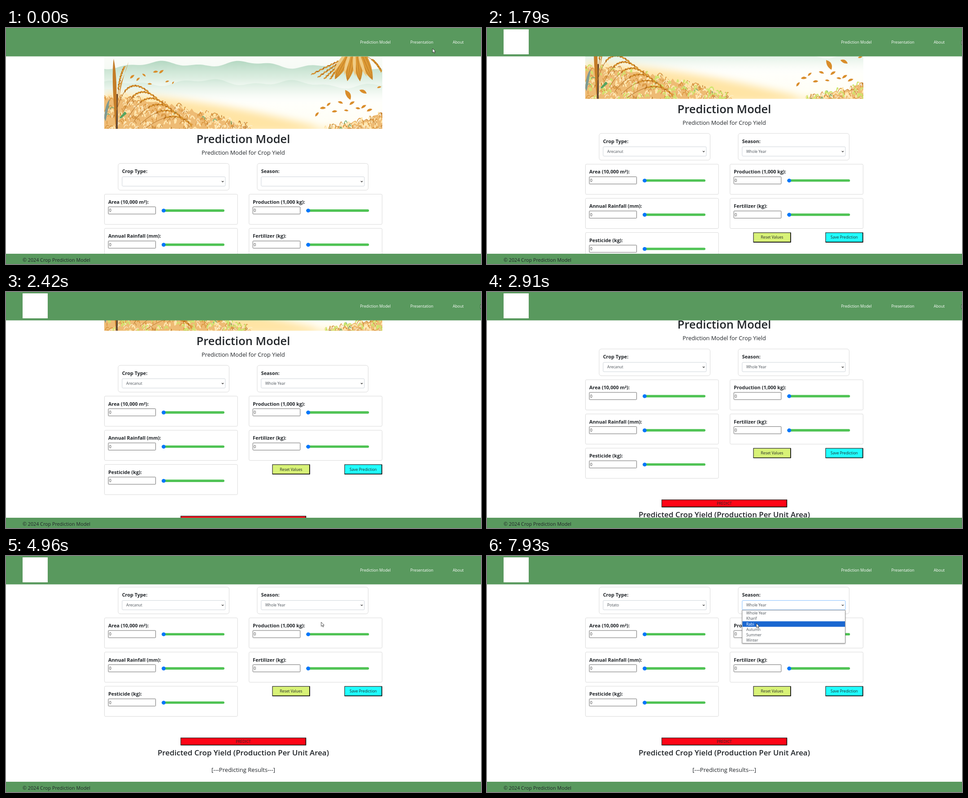
Recreate the animation shown at these times as an HTML page. Size 1059 px wide and 529 px high, loop 7.99 s.

```html
<!DOCTYPE html>
<html lang="en">
<head>
<meta charset="utf-8">
<title>Prediction Model</title>
<style>
html, body { margin: 0; width: 100%; height: 100%; overflow: hidden; background: #fff; }
svg { display: block; }
text { font-family: "Open Sans", "Noto Sans", sans-serif; white-space: pre; }
.pop { filter: drop-shadow(0 1px 1.5px #0006); }
</style>
</head>
<body>
<svg id="stage" width="1059" height="529" viewBox="0 0 1059 529"></svg>
<script>
const LOOP = 7990, ROW = 12.29, LIST_TOP = 121.8;
const INK = '#212529', GRAY = '#495057', GREEN = '#59995e';
const CROPS = ['Arecanut', 'Arhar/Tur', 'Castor seed', 'Coconut', 'Cotton(lint)', 'Dry chillies', 'Gram',
  'Jute', 'Linseed', 'Maize', 'Mesta', 'Niger seed', 'Onion', 'Other Rabi pulses', 'Potato',
  'Rapeseed &amp;Mustard', 'Rice', 'Sesamum', 'Small millets', 'Sugarcane'];
const SEASONS = ['Whole Year', 'Kharif', 'Rabi', 'Autumn', 'Summer', 'Winter'];
const FIELDS = ['Area (10,000 m²):', 'Production (1,000 kg):', 'Annual Rainfall (mm):', 'Fertilizer (kg):', 'Pesticide (kg):'];

let seed = 11;
const rnd = (a = 0, b = 1) => a + (b - a) * (seed = seed * 16807 % 2147483647) / 2147483647;
const times = (n, fn) => Array.from({ length: n }, (_, i) => fn(i)).join('');

// ---- drawing helpers ----
const text = (x, y, size, str, fill = INK, more = '') =>
  `<text x="${x}" y="${y}" font-size="${size}" fill="${fill}" ${more}>${str}</text>`;
const mid = (y, size, str, weight = 400, x = 529) =>
  text(x, y, size, str, INK, `text-anchor="middle" font-weight="${weight}"`);
const rect = (x, y, w, h, fill, more = '') =>
  `<rect x="${x}" y="${y}" width="${w}" height="${h}" fill="${fill}" ${more}/>`;
const line = (d, color, w, more = '') =>
  `<path d="${d}" fill="none" stroke="${color}" stroke-width="${w}" ${more}/>`;
const shape = (d, fill, more = '') => `<path d="${d}" fill="${fill}" ${more}/>`;
const label = (x, y, str) => text(x, y, 10.85, str, INK, 'font-weight="700"');

// ---- banner ----
const ground = x => x < 340 ? 86 + 74 * (x / 340) ** 1.6 : 165 - Math.max(0, x - 470) * .25;
const outline = (y, step = 5) => 'M0 170' + times(620 / step + 1, i => `L${i * step} ${y(i * step).toFixed(1)}`) + 'V170Z';
const ridge = (y, phase) => outline(x => y + 5 * Math.sin(x / 32 + phase) + 3 * Math.sin(x / 13 + phase) - 5 * Math.sin(x / 150));

const leaf = (x, y, len, angle, fill = '#d98d2b') =>
  shape(`M${-len / 2} 0Q0 ${-len * .5} ${len / 2} 0Q0 ${len * .3} ${-len / 2} 0Z`, fill,
    `transform="translate(${x} ${y}) rotate(${angle})"`);
const drift = (n, x, y, w, h, size) =>
  times(n, i => leaf(x + w * (i + .5) / n, y + rnd(0, h), rnd(.5, 1) * size, rnd(-70, 50)));

// A stalk along a curve, with grains on its outer part
function ear(x0, y0, cx, cy, x1, y1) {
  const n = 18;
  return line(`M${x0} ${y0}Q${cx} ${cy} ${x1} ${y1}`, '#b9772a', 1.1) + times(n, i => {
    const t = .35 + .65 * i / n, u = 1 - t;
    const x = u * u * x0 + 2 * u * t * cx + t * t * x1, y = u * u * y0 + 2 * u * t * cy + t * t * y1;
    const a = Math.atan2(u * (cy - y0) + t * (y1 - cy), u * (cx - x0) + t * (x1 - cx)) * 180 / Math.PI;
    return leaf(x, y, 8, a + (i % 2 ? 32 : -32), i % 3 ? '#d8942f' : '#b9701d');
  });
}

const blades = (n, color, w, more = '') => line(times(n, () => {
  const x = rnd() < .74 ? rnd(0, 320) : rnd(490, 620), y = rnd(ground(x), 172), dx = rnd(-7, 11);
  return `M${x.toFixed(1)} ${y.toFixed(1)}q${(dx * .4).toFixed(1)} -9 ${dx.toFixed(1)} ${rnd(-7, 3).toFixed(1)}`;
}), color, w, 'stroke-linecap="round" ' + more);

const cob = (x, angle) => `<g transform="translate(${x} 14) rotate(${angle})">` +
  shape('M-9 -18Q-14 18 0 42Q13 18 9 -18Z', '#dc9a35') +
  line('M-5 -18Q-8 14 -1 38M0 -18V40M5 -18Q8 14 1 38', '#b06c1e', 1.3, 'stroke-dasharray="2 1.3"') +
  shape('M-9 -18Q-16 14 -9 30Q-4 0 -4 -18Z', '#f0cc85') + '</g>';

const banner = () => '<svg x="219" y="64" width="620" height="162">' +
  rect(0, 0, 620, 162, 'url(#sky)') +
  shape(ridge(21, 1), 'url(#hill)') + shape(ridge(62, 4), 'url(#hill)', 'opacity=".35"') +
  shape(outline(x => ground(x * .72) - 4), '#ffe4a4', 'filter="url(#soft)"') +
  shape(outline(x => ground(x) + rnd(0, 9)), '#eebb74') +
  blades(150, '#ffe6ae', 3) + blades(150, '#d9953f', 1.6) + blades(70, '#b5742b', 1) +
  blades(110, '#fdf2d2', 1.2) + blades(12, '#6aa86b', 1.6) + blades(130, '#cfe56e', 2.4, 'id="lime"') +
  line('M28 162V84', '#5c4638', 4) + shape('M21 5Q15 50 26 162Q31 50 21 5Z', '#c47c27') +
  shape('M36 60Q50 30 54 12Q33 70 29 130Z', '#d7953c') +
  shape('M0 138Q2 106 12 96Q9 118 3 145Z', '#7f9a92') + shape('M34 137L46 123 50 128 37 139Z', '#55a35f') +
  ear(30, 110, 30, 50, 46, 22) +
  times(6, i => ear(28 + 13 * i, 120 + 8 * i, 50 + 22 * i, 36 + 15 * i, 101 + 19 * i, 82 + 15 * i)) +
  times(5, i => {
    const a = 2.72 - i * .13, r = 100 - i * 10;
    return ear(552, 0, 530 - 3 * i, 4 + 5 * i, 552 + r * Math.cos(a), r * Math.sin(a));
  }) +
  ear(585, 0, 605, 8, 618, 34) + times(4, i => cob(534 + 16 * i, 28 - 17 * i)) +
  drift(8, 56, 33, 104, 30, 13) + drift(10, 468, 98, 130, 32, 16) +
  leaf(543, 86, 25, 62) + leaf(577, 79, 18, 25) + leaf(613, 69, 10, -15) + '</svg>';

// ---- form ----
const select = (x, title, id) =>
  rect(x, 303.5, 247.5, 60, '#fff', 'rx="5" stroke="#dadada"') + label(x + 8.7, 325, title) +
  rect(x + 8.9, 333.5, 230, 21, '#fff', `id="${id}Box" rx="2" stroke="#ced4da"`) +
  text(x + 18, 347, 8.5, '', GRAY, `id="${id}"`) +
  line(`M${x + 231} 343l2.1 2.2 2.1 -2.2`, '#333', 1.2);

function field(title, i) {
  const x = 219.5 + i % 2 * 322.3, y = 372.5 + (i >> 1) * 76.6;
  return rect(x, y, 296.7, 67.7, '#fff', 'rx="2.5" stroke="#dadada"') + label(x + 8.5, y + 21.3, title) +
    rect(x + 8.6, y + 28.3, 105.5, 16.2, '#fff', 'rx="1" stroke="#6c6c6c"') +
    text(x + 10.5, y + 39.8, 8.5, '0', '#333') +
    rect(x + 127.5, y + 34, 140, 5.4, '#4fc354', 'rx="2.7"') +
    `<circle cx="${x + 132}" cy="${y + 36.8}" r="4.3" fill="#0075ff"/>`;
}

const button = (x, y, w, h, fill, str) =>
  rect(x, y, w, h, fill, 'stroke="#333" stroke-width="1.3"') +
  line(`M${x} ${y + h}h${w}v${-h}`, '#000', 1.3) + mid(y + h / 2 + 3.1, 8.5, str, 400, x + w / 2);

const page = banner() + mid(258, 25.5, 'Prediction Model', 600) +
  mid(284, 12.8, 'Prediction Model for Crop Yield') +
  select(250, 'Crop Type:', 'crop') + select(560, 'Season:', 'season') +
  FIELDS.map(field).join('') +
  button(594.1, 526.1, 82.9, 21.2, '#d8f277', 'Reset Values') +
  button(755, 526.1, 82.9, 21.2, '#20ffff', 'Save Prediction') +
  button(389.7, 641.5, 278.8, 16, '#ff0516', 'PREDICT') +
  mid(681, 16.9, 'Predicted Crop Yield (Production Per Unit Area)', 600) +
  mid(718, 13.1, '[---Predicting Results---]');

const popup = (id, x, items, h, bar) =>
  `<g id="${id}" class="pop">` + rect(x, 121.5, 229.5, h, '#fff', 'stroke="#888" stroke-width=".8"') +
  rect(x + .4, 0, bar ? 219.5 : 228.8, ROW, '#1a67d0', 'class="hot"') +
  items.map((s, i) => text(x + 9.1, 131 + i * ROW, 8.5, s, GRAY, 'class="item"')).join('') +
  (bar ? rect(x + 220, 122, 9, h - 1, '#f1f1f1') + rect(x + 221, 131, 7.2, 83, '#c1c1c1') +
    shape(`M${x + 222.4} 127.8h4.4l-2.2 -2.6Z`, '#999') +
    shape(`M${x + 222.4} 361.2h4.4l-2.2 2.6Z`, '#444') : '') + '</g>';

const fade = (id, list) => `<linearGradient id="${id}" x2="0" y2="1">` +
  list.map(([o, c, a = 1]) => `<stop offset="${o}" stop-color="${c}" stop-opacity="${a}"/>`).join('') +
  '</linearGradient>';

document.getElementById('stage').innerHTML = '<defs>' +
  fade('sky', [[0, '#fafcf8'], [.3, '#f3f9f3'], [.6, '#fffffc'], [1, '#fffef4']]) +
  fade('hill', [[0, '#b4d8c2'], [.25, '#d8ecde', .8], [.5, '#fff', 0]]) +
  '<filter id="soft"><feGaussianBlur stdDeviation="9"/></filter></defs>' +
  `<g id="page">${page}</g>` +
  rect(0, 0, 1059, 63.6, GREEN) + rect(0, 506, 1059, 23, GREEN) +
  rect(37, 3, 56, 56, '#fff', 'id="logo"') +
  text(789.4, 34.7, 8.65, 'Prediction Model', '#fff') + text(901.5, 34.7, 8.65, 'Presentation', '#fff') +
  text(996, 34.7, 8.65, 'About', '#fff') +
  text(37, 523.6, 10.75, '© 2024 Crop Prediction Model') +
  popup('cropList', 259, CROPS, 246.3, true) + popup('seasonList', 569, SEASONS, 74, false) +
  '<path id="cursor" d="M0 0V9.4L2.2 7.4 3.8 10.9 5.3 10.2 3.8 6.9H6.7Z" fill="#fff" stroke="#222" stroke-width=".8"/>';

// ---- motion ----
const $ = id => document.getElementById(id);
// Start, end, and the path between two points
const MOVES = [
  [0, 560, [951, 46], [1058, 28]],
  [4620, 5240, [931, 175], [385, 111]],
  [5380, 6070, [385, 111], [309.5, 302.5]],
  [6600, 7110, [309.5, 302.5], [600, 112]],
  [7440, 7930, [600, 112], [600.5, 151]]
];
// Screen refresh runs: start time and interval
const RUNS = [[0, 70], [1220, 70.4], [4620, 69], [6600, 70]];

const part = (t, a, b) => Math.min(1, Math.max(0, (t - a) / (b - a)));
const latest = (list, t) => list.filter(r => r[0] <= t).pop();

function pointer(t) {
  const [a, b, from, to] = latest(MOVES, t), u = part(t, a, b), e = u * u * (3 - 2 * u);
  return from.map((v, i) => v + (to[i] - v) * e);
}

// Steady drag that slows down towards the end
const scroll = t => 139.2 * part(t, 1190, 2417) + 88.8 * part(t, 2417, 3614) + 5.8 * part(t, 3614, 3960);

function tick(t) {
  const [start, step] = latest(RUNS, t);
  return start + Math.floor((t - start) / step) * step;
}

const show = (id, on) => $(id).setAttribute('visibility', on ? 'visible' : 'hidden');
const focus = (id, on) => $(id).setAttribute('stroke', on ? '#80bdff' : '#ced4da');

function list(id, open, y) {
  show(id, open);
  const hot = Math.max(0, Math.floor((y - LIST_TOP) / ROW));
  $(id).querySelector('.hot').setAttribute('y', LIST_TOP + hot * ROW);
  $(id).querySelectorAll('.item').forEach((el, i) => el.setAttribute('fill', i === hot ? '#fff' : GRAY));
}

function draw(time) {
  const t = tick(time), [x, y] = pointer(t), loaded = t >= 140;
  $('page').setAttribute('transform', `translate(0 ${-scroll(t)})`);
  $('cursor').setAttribute('transform', `translate(${x} ${y})`);
  show('logo', loaded);
  show('lime', loaded);
  $('crop').textContent = !loaded ? '' : t < 6600 ? 'Arecanut' : 'Potato';
  $('season').textContent = loaded ? 'Whole Year' : '';
  focus('cropBox', t >= 5240 && t < 7400);
  focus('seasonBox', t >= 7300);
  list('cropList', t >= 5240 && t < 6600, y);
  list('seasonList', t >= 7230, y);
}

const begin = performance.now();
(function frame() {
  draw((performance.now() - begin) % LOOP);
  requestAnimationFrame(frame);
})();
</script>
</body>
</html>
```
